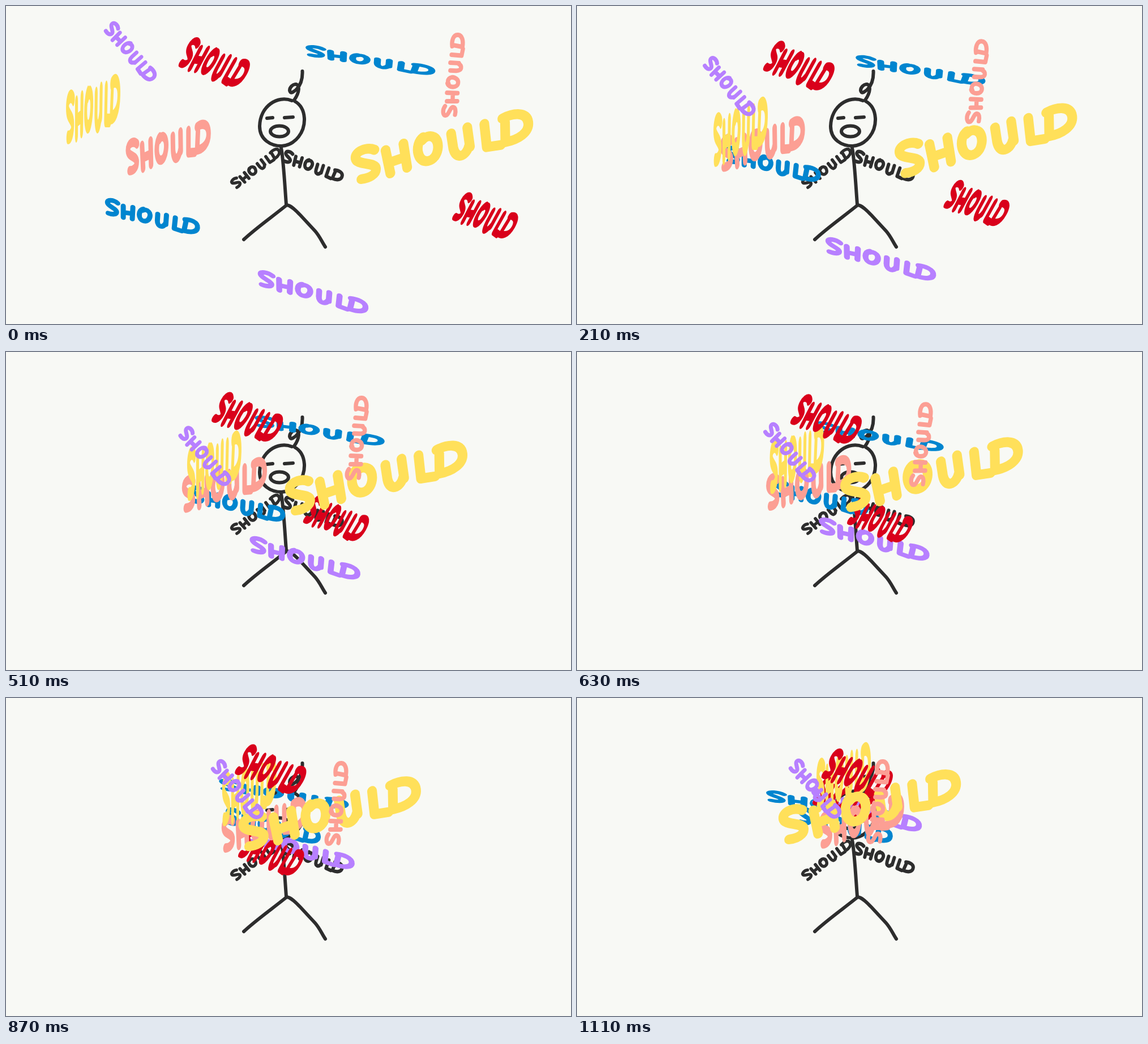
An HTML page for the animation above (1.62 s loop, 998x561 px).

```html
<!DOCTYPE html>
<html lang="en">
<head>
<meta charset="utf-8">
<title>Should</title>
<style>
  html, body { margin: 0; width: 100%; height: 100%; overflow: hidden; background: #f8f9f5; }
  svg { display: block; width: 100vw; height: 100vh; }
  path, ellipse { fill: none; stroke-linecap: round; stroke-linejoin: round; }
</style>
</head>
<body>
<svg viewBox="0 0 998 561" role="img" aria-label="A stick figure buried under the word should">
  <defs>
    <!-- Hand lettering: S is centred on the origin, the line runs along x -->
    <g id="word" stroke-width="17">
      <path d="M18 -20C4 -29 -17 -25 -16 -13C-15 0 17 1 17 13C17 23 4 27 -10 25"/>
      <path d="M37 -15L41 27M69 -19L71 24M41 8L69 5"/>
      <path d="M104 -22C87 -14 89 21 109 21C128 21 134 -9 122 -18C116 -23 108 -22 102 -17"/>
      <path d="M153 -17L154 8C156 31 175 30 182 10M182 -21L183 14"/>
      <path d="M212 -20L212 21L237 23"/>
      <path d="M244 -22C262 -27 288 -25 288 -4C288 13 268 21 245 20M248 -14L245 18"/>
    </g>
  </defs>
  <g stroke="#2d2d2d" stroke-width="6">
    <path d="M505 167C480 157 449 176 448 212C448 236 468 247 487 247C512 245 528 222 527 198C526 182 519 173 510 168"/>
    <path d="M523.5 115C524 128 521 139 513 147C507 153 502 155 501 149C501 143 507 138 512 138C519 139 519 152 509 166"/>
    <path d="M461 198L471 197M492 197L507 196"/>
    <ellipse cx="483" cy="221" rx="16" ry="9.5"/>
    <path d="M486 250C490 270 492 310 495 350"/>
    <path d="M420 412C440 393 470 372 496 351C504 352 512 361 520 369L546 397C554 406 558 416 564 425"/>
  </g>
  <g id="words"></g>
</svg>
<script>
const LOOP = 1620, MOVE = 1110, STEP = 30;
const S_TO_D = 267; // lettering units between the first and last letter
const INK = '#2d2d2d', BLUE = '#0085cf', PURPLE = '#b780ff', RED = '#d9001b',
      PINK = '#fc9f94', YELLOW = '#ffe05a';

// from, to: centres of S and D; down: the letters' downward direction and height;
// end: total shift; via: turning points as [ms, x, y]. Listed from back to front.
const words = [
  { color: INK, from: [406, 312], to: [477, 260], down: [.18, .25] },
  { color: INK, from: [498, 266], to: [586, 300], down: [-.12, .35] },
  { color: BLUE, from: [546, 80], to: [737, 113], down: [-.05, .31], end: [-195, 94] },
  { color: BLUE, from: [187, 355], to: [327, 390], down: [-.05, .47], end: [215, -147],
    via: [[200, 86, -92], [555, 160, -105], [880, 215, -147]] },
  { color: PURPLE, from: [459, 482], to: [622, 530], down: [-.05, .45], end: [-31, -307] },
  { color: RED, from: [806, 354], to: [888, 390], down: [-.42, .75], end: [-372, -190],
    via: [[195, -137, -14], [370, -180, -106], [555, -290, -67], [870, -378, -97]] },
  { color: PINK, from: [223, 265], to: [348, 232], down: [0, .97], end: [216, -33] },
  { color: YELLOW, from: [113, 195], to: [193, 166], down: [-.03, 1.42], end: [317, -42],
    via: [[210, 135, 40], [400, 195, 30]] },
  { color: RED, from: [324, 82], to: [413, 121], down: [-.45, .8], end: [127, 34] },
  { color: YELLOW, from: [635, 278], to: [902, 215], down: [.11, 1], end: [-253, -56] },
  { color: PURPLE, from: [187, 40], to: [253, 122], down: [-.33, .28], end: [201, 80],
    via: [[370, 87, 108], [555, 146, 102], [870, 189, 81]] },
  { color: PINK, from: [783, 186], to: [799, 61], down: [.43, .04], end: [-258, 61],
    via: [[370, -147, 20], [510, -170, 30], [870, -206, 64]] }
];

const layer = document.getElementById('words');
for (const word of words) {
  const { color, from, to, end = [0, 0], via = [] } = word;
  word.along = to.map((v, axis) => (v - from[axis]) / S_TO_D);
  word.route = [[0, 0, 0], ...via, [MOVE, ...end]];
  word.node = document.createElementNS('http://www.w3.org/2000/svg', 'use');
  word.node.setAttribute('href', '#word');
  word.node.setAttribute('stroke', color);
  layer.append(word.node);
}

// Steady travel along each straight leg of the route
function shift(route, t) {
  const next = Math.max(1, route.findIndex(([time]) => time >= t));
  const [t0, ...a] = route[next - 1];
  const [t1, ...b] = route[next];
  const p = (t - t0) / (t1 - t0);
  return a.map((v, axis) => v + (b[axis] - v) * p);
}

function draw(ms) {
  const t = Math.min(MOVE, Math.floor((ms % LOOP) / STEP) * STEP);
  for (const { node, from, along, down, route } of words) {
    const [dx, dy] = shift(route, t);
    const matrix = [...along, ...down, from[0] + dx, from[1] + dy];
    node.setAttribute('transform', `matrix(${matrix.join(' ')})`);
  }
}

let begin;
function tick(now) {
  begin ??= now;
  draw(now - begin);
  requestAnimationFrame(tick);
}
draw(0);
requestAnimationFrame(tick);
</script>
</body>
</html>
```
